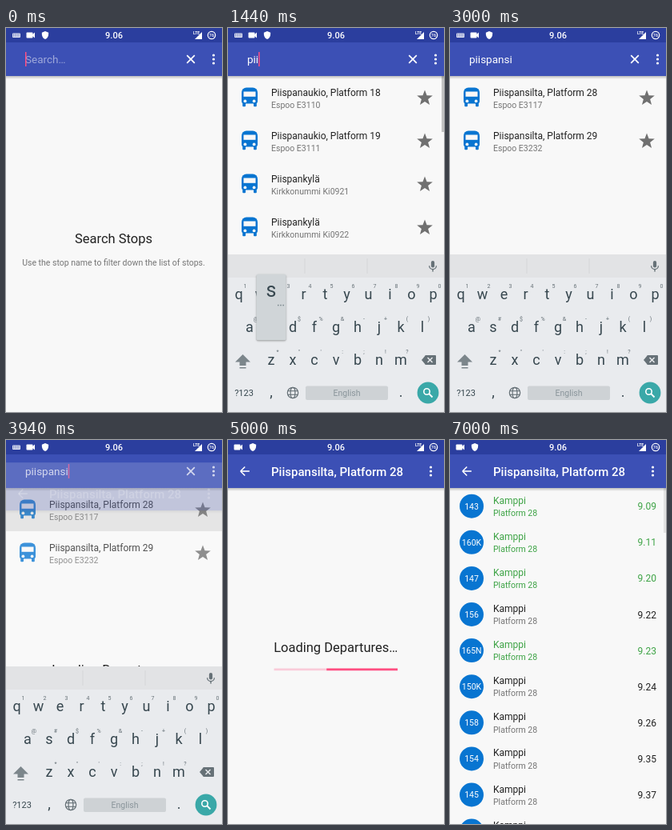
An HTML page with a canvas for the animation above (7.7 s loop, 270 by 480 pixels).

```html
<!DOCTYPE html>
<html lang="en">
<head>
<meta charset="utf-8">
<title>Stop search</title>
<style>
html, body { margin: 0; height: 100%; overflow: hidden; background: #f8f8f8; }
canvas { display: block; width: 100vw; height: 100vh; }
</style>
</head>
<body>
<canvas id="stage"></canvas>
<script>
const W = 270, H = 480, LOOP = 7700;
const canvas = document.getElementById('stage');
const ctx = canvas.getContext('2d');
const PAGE = '#f8f8f8', BAR = '#3c50b5', STATUS = '#2b3e9e', PINK = '#ff4f82';
const INK = '#212121', GREY = '#757575', BLUE = '#0875d1';
const KEYS = '#e9ebee', LETTER = '#37474f', SYMBOL = '#667177';

const clamp = v => Math.max(0, Math.min(1, v));
const span = (t, from, to) => clamp((t - from) / (to - from));
const mix = (a, b, p) => a + (b - a) * p;
const easeOut = p => 1 - (1 - p) ** 3;

function rect(x, y, w, h, color) {
  ctx.fillStyle = color;
  ctx.fillRect(x, y, w, h);
}

function round(x, y, w, h, r, color) {
  ctx.fillStyle = color;
  ctx.beginPath();
  ctx.roundRect(x, y, w, h, r);
  ctx.fill();
}

function disc(x, y, r, color) {
  ctx.fillStyle = color;
  ctx.beginPath();
  ctx.arc(x, y, r, 0, 2 * Math.PI);
  ctx.fill();
}

function ring(x, y, rx, ry, color, width) {
  ctx.strokeStyle = color;
  ctx.lineWidth = width;
  ctx.beginPath();
  ctx.ellipse(x, y, rx, ry, 0, 0, 2 * Math.PI);
  ctx.stroke();
}

function line(x1, y1, x2, y2, color, width) {
  ctx.strokeStyle = color;
  ctx.lineWidth = width;
  ctx.beginPath();
  ctx.moveTo(x1, y1);
  ctx.lineTo(x2, y2);
  ctx.stroke();
}

function cross(x, y, r, color, width) {
  line(x - r, y - r, x + r, y + r, color, width);
  line(x - r, y + r, x + r, y - r, color, width);
}

function triangle(x1, y1, x2, y2, x3, y3, color) {
  ctx.fillStyle = color;
  ctx.beginPath();
  ctx.moveTo(x1, y1);
  ctx.lineTo(x2, y2);
  ctx.lineTo(x3, y3);
  ctx.fill();
}

function text(str, x, y, size, color, align = 'left', weight = 400) {
  ctx.font = `${weight} ${size}px Roboto, sans-serif`;
  ctx.textAlign = align;
  ctx.fillStyle = color;
  ctx.fillText(str, x, y);
}

function layer(dy, alpha, draw) {
  ctx.save();
  ctx.translate(0, dy);
  ctx.globalAlpha = alpha;
  draw();
  ctx.restore();
}

// Icons
function bus(x, y) {
  round(x - 10, y - 12.5, 20, 20, [6, 6, 3, 3], BLUE);
  rect(x - 7.5, y - 7.5, 15, 6.3, PAGE);
  for (const side of [-1, 1]) {
    disc(x + side * 5.6, y + 4.4, 1.9, PAGE);
    round(x + side * 6.9 - 1.9, y + 6, 3.8, 5.2, 1, BLUE);
  }
}

function star(x, y, r) {
  ctx.fillStyle = '#707070';
  ctx.beginPath();
  for (let i = 0; i < 10; i++) {
    const a = Math.PI * (i / 5 - .5), d = i % 2 ? r * .42 : r;
    ctx.lineTo(x + d * Math.cos(a), y + d * Math.sin(a));
  }
  ctx.fill();
}

function mic(x, y) {
  round(x - 2.1, y - 7, 4.2, 8.6, 2.1, SYMBOL);
  ctx.strokeStyle = SYMBOL;
  ctx.lineWidth = 1.3;
  ctx.beginPath();
  ctx.arc(x, y - .7, 4.4, 0, Math.PI);
  ctx.stroke();
  rect(x - .7, y + 3.6, 1.4, 3, SYMBOL);
}

function shield(x, y) {
  ctx.fillStyle = '#fff';
  ctx.beginPath();
  ctx.moveTo(x, y - 5);
  ctx.lineTo(x + 4.2, y - 3.2);
  ctx.quadraticCurveTo(x + 4.5, y + 3.5, x, y + 5);
  ctx.quadraticCurveTo(x - 4.5, y + 3.5, x - 4.2, y - 3.2);
  ctx.fill();
}

function statusBar(withKeyboard) {
  rect(0, 0, W, 18, STATUS);
  let x = 13;
  if (withKeyboard) {
    round(x - 5, 6.5, 10, 5.5, 1, '#e3e6f3');
    for (let i = 0; i < 8; i++) rect(x - 4 + i % 4 * 2.2, i < 4 ? 7.500 : 9.5, 1.1, 1, STATUS);
    x += 18;
  }
  round(x - 5.500, 5.5, 8, 7, 1, '#fff');
  triangle(x + 1, 9, x + 5, 5.5, x + 5, 12.5, '#fff');
  shield(x + 18, 9);
  text('9.06', 135, 13, 11, '#fff', 'center', 500);
  text('LTE', 234, 8, 5, '#fff', 'left', 700);
  triangle(236, 14, 245, 14, 245, 5, '#fff');
  ring(257, 9, 4.7, 4.7, '#fff', 1.2);
  text('76', 257, 11.2, 5.5, '#fff', 'center', 500);
}

function toolbar(dotsX) {
  rect(0, 0, W, 60, BAR);
  const shade = ctx.createLinearGradient(0, 60, 0, 64);
  shade.addColorStop(0, 'rgba(0,0,0,.24)');
  shade.addColorStop(1, 'rgba(0,0,0,0)');
  rect(0, 60, W, 4, shade);
  for (const dy of [-5, 0, 5]) disc(dotsX, 39 + dy, 1.6, '#fff');
}

// Keyboard
const PITCH = 27;
const keyRows = ['qwertyuiop', 'asdfghjkl', 'zxcvbnm'];
const hintRows = ['1234567890', '@#$%&-+()', '*"\':;!?'];
const keyX = (row, i) => W / 2 + PITCH * (i - (row.length - 1) / 2);

function keyboard() {
  rect(0, 283, W, 240, KEYS);
  rect(0, 283, W, 29, '#e2e3e5');
  for (const x of [96, 174]) rect(x - .5, 288, 1, 19, '#d3d6d8');
  mic(256, 298);
  keyRows.forEach((row, r) => {
    const y = 339 + 41 * r;
    [...row].forEach((key, i) => {
      text(key, keyX(row, i), y, 18, LETTER, 'center');
      text(hintRows[r][i], keyX(row, i) + 8, y - 14.5, 7, SYMBOL, 'center');
    });
  });
  triangle(9, 417.5, 18.5, 408, 28, 417.5, '#7c868b');
  rect(14.5, 417, 8, 5, '#7c868b');
  rect(14.5, 424, 8, 1.5, '#7c868b');
  triangle(242, 415, 247, 409, 247, 421, SYMBOL);
  round(246.5, 409, 13.5, 12, 1, SYMBOL);
  cross(252.5, 415, 3, KEYS, 1.4);
  text('?123', 20, 460, 11, LETTER, 'center');
  text(',', 54, 461, 18, LETTER, 'center');
  for (const rx of [6.7, 2.9]) ring(81, 456, rx, 6.7, SYMBOL, 1.2);
  for (const dy of [-2.3, 2.3]) line(75, 456 + dy, 87, 456 + dy, SYMBOL, 1.1);
  round(97, 447.5, 103, 17.5, 2, '#ced2d5');
  text('English', 148.5, 460, 10.5, '#8a959b', 'center');
  text('.', 216, 461, 18, LETTER, 'center');
  disc(250, 456, 13.4, '#3aa8a8');
  ring(248.5, 454.5, 3.7, 3.7, '#fff', 1.6);
  line(251.2, 457.2, 255.5, 461.5, '#fff', 1.9);
}

function keyPopup(key) {
  const r = keyRows.findIndex(row => row.includes(key));
  const x = Math.min(249, keyX(keyRows[r], keyRows[r].indexOf(key)));
  const top = 268.5 + 39.3 * r;
  ctx.save();
  ctx.shadowColor = 'rgba(0,0,0,.35)';
  ctx.shadowBlur = 2;
  ctx.shadowOffsetY = 1;
  round(x - 18.5, top, 37, 82.5, 2, '#d0d5d8');
  ctx.restore();
  text(key, x, top + 28.5, 25, LETTER, 'center');
  for (let i = 0; i < 3; i++) rect(x + 8 + i * 3.2, top + 38, 1.5, 1.5, '#78858b');
}

// Typing: one key press at a steady pace, its letter appearing on release.
const QUERY = 'piispansi', FIRST_PRESS = 690, PRESS_GAP = 222;
const pressTime = i => FIRST_PRESS + PRESS_GAP * i;
const typedAt = t => [...QUERY].filter((key, i) => t >= pressTime(i) + 120).join('');

const stops = [
  ['Piispanaukio, Platform 18', 'Espoo E3110'],
  ['Piispanaukio, Platform 19', 'Espoo E3111'],
  ['Piispankylä', 'Kirkkonummi Ki0921'],
  ['Piispankylä', 'Kirkkonummi Ki0922'],
  ['Piispansilta, Platform 28', 'Espoo E3117'],
  ['Piispansilta, Platform 29', 'Espoo E3232']
];

function stopList(t, typed) {
  const found = stops.filter(([name]) => name.toLowerCase().startsWith(typed));
  found.forEach(([name, code], i) => {
    const y = 60 + 54 * i;
    bus(27, y + 27);
    text(name, 54, y + 24.7, 12, INK);
    text(code, 54, y + 40, 10.5, GREY);
    star(246, y + 27.7, 10.3);
  });
  if (found.length > 4) rect(267, 60, 3, 70, 'rgba(0,0,0,.22)');
  const press = span(t, 3630, 3850);
  if (!press) return;
  ctx.save();
  ctx.beginPath();
  ctx.rect(0, 60, W, 54);
  ctx.clip();
  disc(100, 87, 180 * press, 'rgba(0,0,0,.1)');
  ctx.restore();
}

function searchScreen(t) {
  const typed = typedAt(t);
  rect(0, 0, W, H, PAGE);
  if (typed.length < 3) {
    const lift = t < 120 ? 0 : 99;
    text('Search Stops', 134.5, 269 - lift, 16.5, INK, 'center');
    text('Use the stop name to filter down the list of stops.', 134.5, 297 - lift, 10.5, GREY, 'center');
  } else {
    stopList(t, typed);
  }
  toolbar(259.5);
  text(typed || 'Search…', 24, 44, 13.5, typed ? '#fff' : 'rgba(255,255,255,.5)');
  const caretX = 24 + (typed ? ctx.measureText(typed).width : 0);
  if (t < 3000 || t >= 3310) rect(caretX, 30, 1.5, 18, PINK);
  cross(231, 39, 4.8, '#fff', 1.7);
}

// Two bars sweep across the track, each swelling halfway; the second starts later.
function progress(t) {
  const x = 57.5, y = 285.5, w = 154.5, h = 2.7;
  const p = Math.max(0, t - 4030) / 2000 % 1, late = span(p, .2, 1);
  const bar = (center, size) => {
    const from = clamp(center - size), to = clamp(center + size);
    rect(x + from * w, y, (to - from) * w, h, PINK);
  };
  rect(x, y, w, h, '#facbd9');
  bar(mix(-.05, 1.67, p), .04 + .32 * Math.sin(Math.PI * p));
  bar(mix(-.95, 1.05, late ** 1.2), .04 + .29 * Math.sin(Math.PI * late));
}

const departures = ['143 9.09 live', '160K 9.11 live', '147 9.20 live', '156 9.22', '165N 9.23 live',
  '150K 9.24', '158 9.26', '154 9.35', '145 9.37', '143 9.39'];

function departureList(t) {
  departures.forEach((entry, i) => {
    const [route, time, live] = entry.split(' ');
    const y = 82.7 + 45.1 * i, green = live && '#3da345';
    disc(27, y, 15, BLUE);
    text(route, 27, y + 3.8, 10.5, '#fff', 'center');
    text('Kamppi', 54, y - 3, 12, green || INK);
    text('Platform 28', 54, y + 12.2, 10.5, green || GREY);
    text(time, 258, y + 4.5, 12, green || INK, 'right');
  });
  rect(267, 60, 3, 56, `rgba(0,0,0,${mix(.22, .09, span(t, 6700, 7000))})`);
}

function departureScreen(t) {
  rect(0, 0, W, H, PAGE);
  const shown = span(t, 5220, 5480);
  if (shown < 1) layer(0, 1 - shown, () => {
    text('Loading Departures…', 134.7, 264.7, 16.5, INK, 'center');
    progress(t);
  });
  if (shown) layer(0, shown, () => departureList(t));
  toolbar(253.5);
  line(16, 39, 26.8, 39, '#fff', 1.6);
  for (const dy of [-5.5, 5.5]) line(15.7, 39, 21.2, 39 + dy, '#fff', 1.6);
  text('Piispansilta, Platform 28', 54, 44.5, 15, '#fff', 'left', 500);
}

function render(t) {
  ctx.setTransform(canvas.width / W, 0, 0, canvas.height / H, 0, 0);
  const enter = span(t, 3900, 4250);
  if (enter < 1) searchScreen(t);
  if (enter) layer(38 * (1 - enter) ** 2.4, span(t, 3900, 4090), () => departureScreen(t));

  const rise = easeOut(span(t, 60, 380)), fall = span(t, 4060, 4370);
  if (rise && fall < 1) layer(60 * (1 - rise) + 40 * fall, rise * (1 - fall), keyboard);
  [...QUERY].forEach((key, i) => {
    if (t >= pressTime(i) && t < pressTime(i) + 200) keyPopup(key);
  });
  statusBar(t < 3990);
}

function resize() {
  const ratio = window.devicePixelRatio || 1;
  canvas.width = Math.round(innerWidth * ratio);
  canvas.height = Math.round(innerHeight * ratio);
}

addEventListener('resize', resize);
resize();
const start = performance.now();
function tick() {
  render((performance.now() - start) % LOOP);
  requestAnimationFrame(tick);
}
tick();
</script>
</body>
</html>
```
